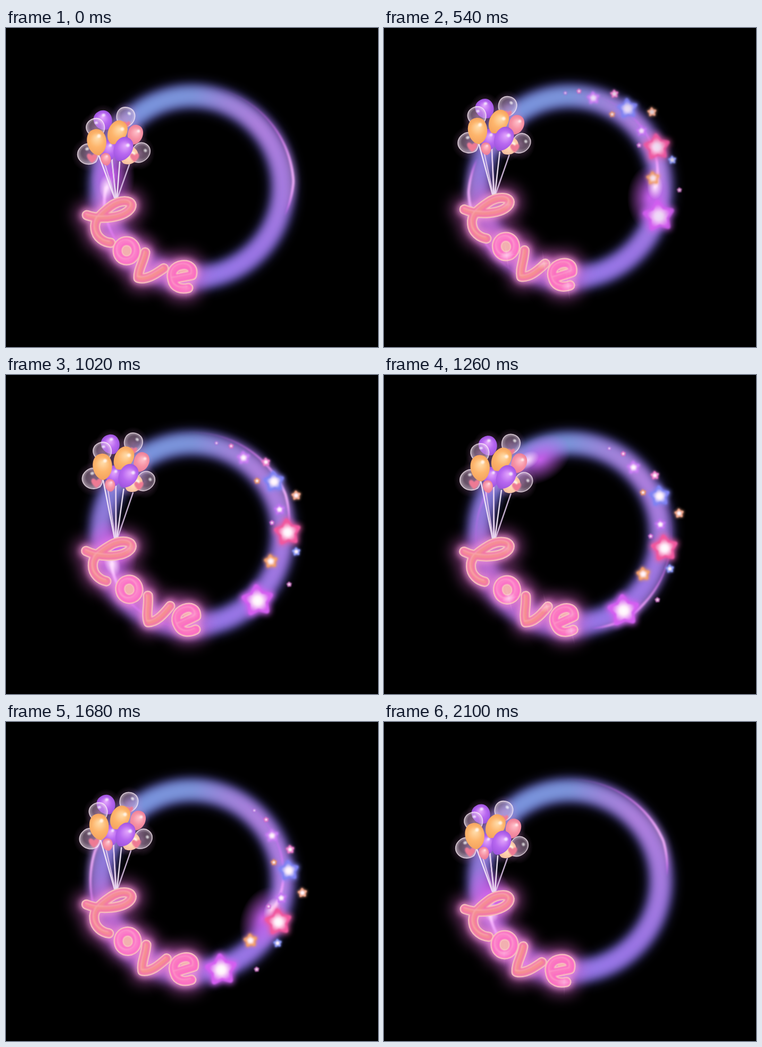
Write an HTML page with a canvas that moves like this. It is 700 px wide and 600 px high and loops after 2160 ms.

```html
<!DOCTYPE html>
<html lang="en">
<head>
<meta charset="utf-8">
<title>Love ring</title>
<style>
html, body { margin: 0; width: 100%; height: 100%; overflow: hidden; background: #000; }
canvas { display: block; }
</style>
</head>
<body>
<canvas id="stage" width="700" height="600"></canvas>
<script>
const W = 700, H = 600, CX = 350, CY = 299;
const LOOP = 2160, STEP = 60, TAU = Math.PI * 2, DEG = Math.PI / 180;
const ctx = document.getElementById('stage').getContext('2d');

const clamp = v => Math.max(0, Math.min(1, v));
const polar = (deg, r) => [CX + r * Math.cos(deg * DEG), CY + r * Math.sin(deg * DEG)];

function layer() {
  const c = document.createElement('canvas');
  c.width = W;
  c.height = H;
  return c.getContext('2d');
}

function scoped(c, draw) {
  c.save();
  draw();
  c.restore();
}

// ---- soft ring, painted once ----
const ring = layer();
function paintRing() {
  const hues = [[0, '#ab7ee4'], [.13, '#9f78ea'], [.25, '#987bee'], [.4, '#b27ae2'], [.5, '#a07be0'],
    [.58, '#837fda'], [.66, '#7d99e2'], [.75, '#7f98de'], [.81, '#a088de'], [.88, '#b383e2'], [1, '#ab7ee4']];
  const g = ring.createConicGradient(0, CX, CY);
  hues.forEach(([at, color]) => g.addColorStop(at, color));
  const hoop = (style, width, blur, alpha) => {
    ring.filter = `blur(${blur}px)`;
    ring.globalAlpha = alpha;
    ring.strokeStyle = style;
    ring.lineWidth = width;
    ring.beginPath();
    ring.arc(CX, CY, 171, 0, TAU);
    ring.stroke();
  };
  hoop('#5a54bc', 50, 10, .65);
  hoop(g, 35, 8, .95);
}
paintRing();

// ---- light streaks ----
const trail = layer();
function streak(head, len, radius, power, width) {
  const n = 90;
  trail.clearRect(0, 0, W, H);
  for (let i = 0; i < n; i++) {
    const u = i / n, v = u + 1.15 / n, p = power(u);
    trail.globalAlpha = p;
    trail.lineWidth = width * p + 1;
    trail.strokeStyle = `rgb(${205 + 50 * p}, ${95 + 115 * p * p}, 255)`;
    trail.beginPath();
    trail.moveTo(...polar(head - u * len, radius(u)));
    trail.lineTo(...polar(head - v * len, radius(v)));
    trail.stroke();
  }
  scoped(ctx, () => {
    ctx.filter = 'blur(7px)';
    ctx.drawImage(trail.canvas, 0, 0);
    ctx.filter = 'blur(1.6px)';
    ctx.drawImage(trail.canvas, 0, 0);
  });
}

function glow(x, y, rx, ry, rot, rgb, alpha) {
  scoped(ctx, () => {
    ctx.translate(x, y);
    ctx.rotate(rot);
    ctx.scale(rx, ry);
    const g = ctx.createRadialGradient(0, 0, 0, 0, 0, 1);
    g.addColorStop(0, `rgba(${rgb},${alpha})`);
    g.addColorStop(.45, `rgba(${rgb},${alpha * .55})`);
    g.addColorStop(1, `rgba(${rgb},0)`);
    ctx.fillStyle = g;
    ctx.fillRect(-1, -1, 2, 2);
  });
}

function drawLights(t) {
  const a = 180 + t / 3, tilt = (a + 90) * DEG;
  streak(a + 198, 105, u => 191 - 9 * Math.max(0, 1 - u / .2),
    u => .85 * Math.pow(Math.sin(Math.PI * Math.pow(u, .45)), 1.7), 4.5);
  glow(...polar(a + 8, 151), 62, 42, tilt, '205,95,240', .95);
  streak(a, 95, u => 178 - 17 * Math.exp(-u * 4.5), u => Math.pow(1 - u, 1.6), 5);
  glow(...polar(a, 160), 24, 15, tilt, '255,225,255', 1);
}

// ---- stars: angle and radius on the ring, size, colour ----
const stars = [
  [35.8, 176, 31, '#d45ff0'], [-10.6, 180, 26, '#f0589f'], [-42.1, 183, 20, '#7f82f2'],
  [-65.5, 173, 12, '#c77cf2'], [-53.8, 194, 8, '#ea78c8'], [-29.9, 209, 9, '#eda085'],
  [-25.2, 171, 10, '#c274f2'], [9.5, 157, 13, '#f09c68'], [0, 199, 8, '#8490f0'],
  [17.8, 206, 4.5, '#cc70c4'], [-17.6, 152, 4.5, '#d064d4'], [-48.8, 158, 5.5, '#ee9464'],
  [-75.6, 181, 4.5, '#e06cc4'], [-84.5, 177, 3.5, '#b074dc']
];

function starPath(r) {
  ctx.beginPath();
  for (let i = 0; i < 10; i++) {
    const a = i * Math.PI / 5 - Math.PI / 2, d = i % 2 ? r * .57 : r;
    ctx.lineTo(d * Math.cos(a), d * Math.sin(a));
  }
  ctx.closePath();
}

function drawStars(t) {
  const alpha = Math.min(clamp((t - 330) / 270), clamp((2010 - t) / 300));
  if (!alpha) return;
  const lag = Math.pow(Math.max(0, 720 - t) / 180, 2) * 8;
  stars.forEach(([angle, r, size, color]) => {
    const a = angle + (t - 780) * .04 - lag * (angle + 68) / 104;
    const [x, y] = polar(a, r);
    scoped(ctx, () => {
      ctx.translate(x, y);
      ctx.rotate(-.1);
      ctx.globalAlpha = alpha;
      const g = ctx.createRadialGradient(0, 0, 0, 0, 0, size);
      g.addColorStop(0, '#fff');
      g.addColorStop(.25, '#fff0fa');
      g.addColorStop(.72, color);
      g.addColorStop(1, color);
      ctx.strokeStyle = color;
      ctx.lineJoin = 'round';
      starPath(size * .85);
      ctx.filter = `blur(${1 + size * .16}px)`;
      ctx.lineWidth = size * .45;
      ctx.stroke();
      ctx.filter = `blur(${size > 10 ? 1.6 : 1}px)`;
      ctx.lineWidth = size * .28;
      ctx.stroke();
      ctx.fillStyle = g;
      ctx.fill();
    });
  });
}

// ---- letters: path, pivot, shift and turn at full sway, colours, glints [x, y, phase] ----
const letters = [
  { path: 'M152 352C180 362 224 356 235 338C242 323 214 321 195 337C178 350 165 362 168 378C170 394 184 403 197 404',
    pivot: [196, 362], shift: [-3, -16], turn: .12, rim: '#f26fae', body: '#f48f92',
    glints: [[234, 338, -120]] },
  { path: 'M227 401C237 401 244 409 244 419C244 429 237 437 227 437C217 437 210 429 210 419C210 409 217 401 227 401Z',
    pivot: [227, 419], shift: [5, -16], turn: -.28, rim: '#fb68c6', body: '#fb80c8',
    hole: [227, 419, 9, 10], glints: [[226, 436, 20]] },
  { path: 'M262 422C259 440 248 455 249 470C264 474 280 464 297 452',
    pivot: [270, 448], shift: [12, -10], turn: -.28, rim: '#f26fb0', body: '#f5918e',
    glints: [[295, 452, -60]] },
  { path: 'M314 472L350 465C354 450 343 445 332 446C316 448 309 460 313 474C316 489 330 492 343 489',
    pivot: [332, 467], shift: [9, -7], turn: -.25, rim: '#fb68c6', body: '#fb7abf',
    hole: [333, 457, 7, 4], glints: [[345, 460, -120], [339, 490, 50]] }
];
letters.forEach(l => { l.shape = new Path2D(l.path); });

// Runs draw(line) in the letter's swayed frame; line strokes its shape.
function onLetter(l, sway, draw) {
  const [px, py] = l.pivot;
  scoped(ctx, () => {
    ctx.translate(px + l.shift[0] * sway, py + l.shift[1] * sway);
    ctx.rotate(l.turn * sway);
    ctx.translate(-px, -py);
    ctx.lineCap = ctx.lineJoin = 'round';
    draw((color, width, blur) => {
      ctx.filter = `blur(${blur}px)`;
      ctx.strokeStyle = color;
      ctx.lineWidth = width;
      ctx.stroke(l.shape);
    });
  });
}

function drawLetterGlow(l, sway) {
  onLetter(l, sway, line => {
    line('rgba(205,95,195,.5)', 50, 13);
    line('rgba(250,150,215,.75)', 26, 6);
  });
}

function drawLetter(l, sway, t) {
  onLetter(l, sway, line => {
    if (l.hole) {
      ctx.fillStyle = '#f2b0b0';
      ctx.beginPath();
      ctx.ellipse(...l.hole, 0, 0, TAU);
      ctx.fill();
    }
    line('#f9cdbe', 19, .7);
    line(l.rim, 14.5, .8);
    line(l.body, 8, 2);
    ctx.translate(-2, -3);
    line('rgba(255,215,215,.3)', 2.5, 1.2);
    ctx.translate(2, 3);
    ctx.filter = 'none';
    const phase = (t + 540) % 720 - 360;
    l.glints.forEach(([x, y, at]) => {
      const power = .75 * clamp(1 - Math.abs(phase - at) / 150);
      if (!power) return;
      glow(x, y, 14, 10, -.3, '255,235,245', power);
      glow(x, y, 2, 28, 0, '255,190,240', power * .4);
      glow(x, y, 24, 2, 0, '255,190,240', power * .4);
    });
  });
}

// ---- balloons: x, y, rx, ry, tilt, kind ----
const skins = {
  purple: ['#e2a4fc', '#b868f0', '#9a50dc'],
  orange: ['#ffdcaa', '#fdb56c', '#f3a05c'],
  pink: ['#ffc0ca', '#f692a4', '#ea7896'],
  cream: ['#fff0dc', '#ffd3ae', '#f5ba9e'],
  clear: ['rgba(235,215,235,.2)', 'rgba(215,190,215,.3)', 'rgba(255,240,250,.7)']
};
const balloons = [
  [183, 174, 18, 19, -.5, 'purple'], [225, 168, 18, 19, .2, 'clear'], [169, 188, 18, 18, -.5, 'clear'],
  [155, 238, 20, 20, -.8, 'clear'], [253, 235, 17, 20, .6, 'clear'], [243, 201, 15, 19, .25, 'pink'],
  [193, 230, 15, 20, -.1, 'purple'], [188, 247, 10, 12, -.2, 'pink'], [231, 240, 17, 18, .6, 'cream'],
  [209, 197, 18, 24, .5, 'orange'], [171, 215, 19, 25, -.15, 'orange'], [220, 228, 18, 24, .45, 'purple']
];
const hearts = [[162, 244, 10], [242, 243, 9], [227, 181, 7]];
const strings = [[174, 238], [181, 240], [197, 222], [199, 250], [214, 252], [232, 257]];
const BX = 205, BY = 210;

function placeBalloon(x, y, sway) {
  const a = .08 * sway, sx = x - BX, sy = (y - BY) * (1 + .05 * sway);
  return [BX + 11 * sway + sx * Math.cos(a) - sy * Math.sin(a),
          BY - 40 * sway + sx * Math.sin(a) + sy * Math.cos(a)];
}

function drawStrings(sway) {
  ctx.lineCap = 'round';
  strings.forEach(([x, y], i) => {
    ctx.strokeStyle = i % 2 ? 'rgba(225,200,235,.85)' : 'rgba(250,238,252,.9)';
    ctx.lineWidth = 2.5;
    ctx.beginPath();
    ctx.moveTo(...placeBalloon(x, y, sway));
    ctx.lineTo(204 + i * 1.2, 319 - 13 * sway);
    ctx.stroke();
  });
}

function drawHeart([x, y, s], sway) {
  scoped(ctx, () => {
    ctx.translate(...placeBalloon(x, y, sway));
    ctx.filter = 'blur(.8px)';
    ctx.fillStyle = '#ee7a94';
    ctx.beginPath();
    ctx.moveTo(0, s);
    ctx.bezierCurveTo(-s * 1.7, -s * .2, -s * .8, -s * 1.4, 0, -s * .4);
    ctx.bezierCurveTo(s * .8, -s * 1.4, s * 1.7, -s * .2, 0, s);
    ctx.fill();
  });
}

function drawBalloon([x, y, rx, ry, tilt, kind], sway) {
  scoped(ctx, () => {
    ctx.translate(...placeBalloon(x, y, sway));
    ctx.rotate(tilt + .08 * sway);
    const [light, mid, dark] = skins[kind];
    const g = ctx.createRadialGradient(rx * .1, -ry * .35, 1, 0, 0, ry * 1.05);
    g.addColorStop(0, light);
    g.addColorStop(.5, mid);
    g.addColorStop(1, dark);
    ctx.fillStyle = g;
    ctx.beginPath();
    ctx.moveTo(0, -ry);
    ctx.bezierCurveTo(rx * 1.3, -ry, rx * 1.25, ry * .75, 0, ry);
    ctx.bezierCurveTo(-rx * 1.25, ry * .75, -rx * 1.3, -ry, 0, -ry);
    ctx.filter = 'blur(.5px)';
    ctx.fill();
    if (kind === 'clear') {
      ctx.strokeStyle = 'rgba(255,240,250,.7)';
      ctx.lineWidth = 1.6;
      ctx.stroke();
    }
    ctx.filter = 'blur(1.2px)';
    ctx.fillStyle = 'rgba(255,255,255,.75)';
    ctx.beginPath();
    ctx.ellipse(rx * .3, -ry * .45, rx * .18, ry * .14, .4, 0, TAU);
    ctx.fill();
  });
}

function drawBalloonGlow(sway) {
  balloons.forEach(([x, y, rx, ry]) =>
    glow(...placeBalloon(x, y, sway), rx * 1.6, ry * 1.6, 0, '205,130,205', .4));
}

function drawBalloons(sway) {
  balloons.slice(0, 9).forEach(b => drawBalloon(b, sway));
  hearts.forEach(h => drawHeart(h, sway));
  balloons.slice(9).forEach(b => drawBalloon(b, sway));
}

function render(t) {
  const sway = (1 - Math.cos(TAU * t / LOOP)) / 2;
  ctx.fillStyle = '#000';
  ctx.fillRect(0, 0, W, H);
  ctx.drawImage(ring.canvas, 0, 0);
  letters.forEach(l => drawLetterGlow(l, sway));
  drawLights(t);
  drawStars(t);
  drawBalloonGlow(sway);
  drawStrings(sway);
  letters.forEach(l => drawLetter(l, sway, t));
  drawBalloons(sway);
}

const start = performance.now();
let shown = -1;
function tick() {
  const t = Math.floor((performance.now() - start) / STEP) * STEP % LOOP;
  if (t !== shown) render(shown = t);
  requestAnimationFrame(tick);
}
tick();
</script>
</body>
</html>
```
